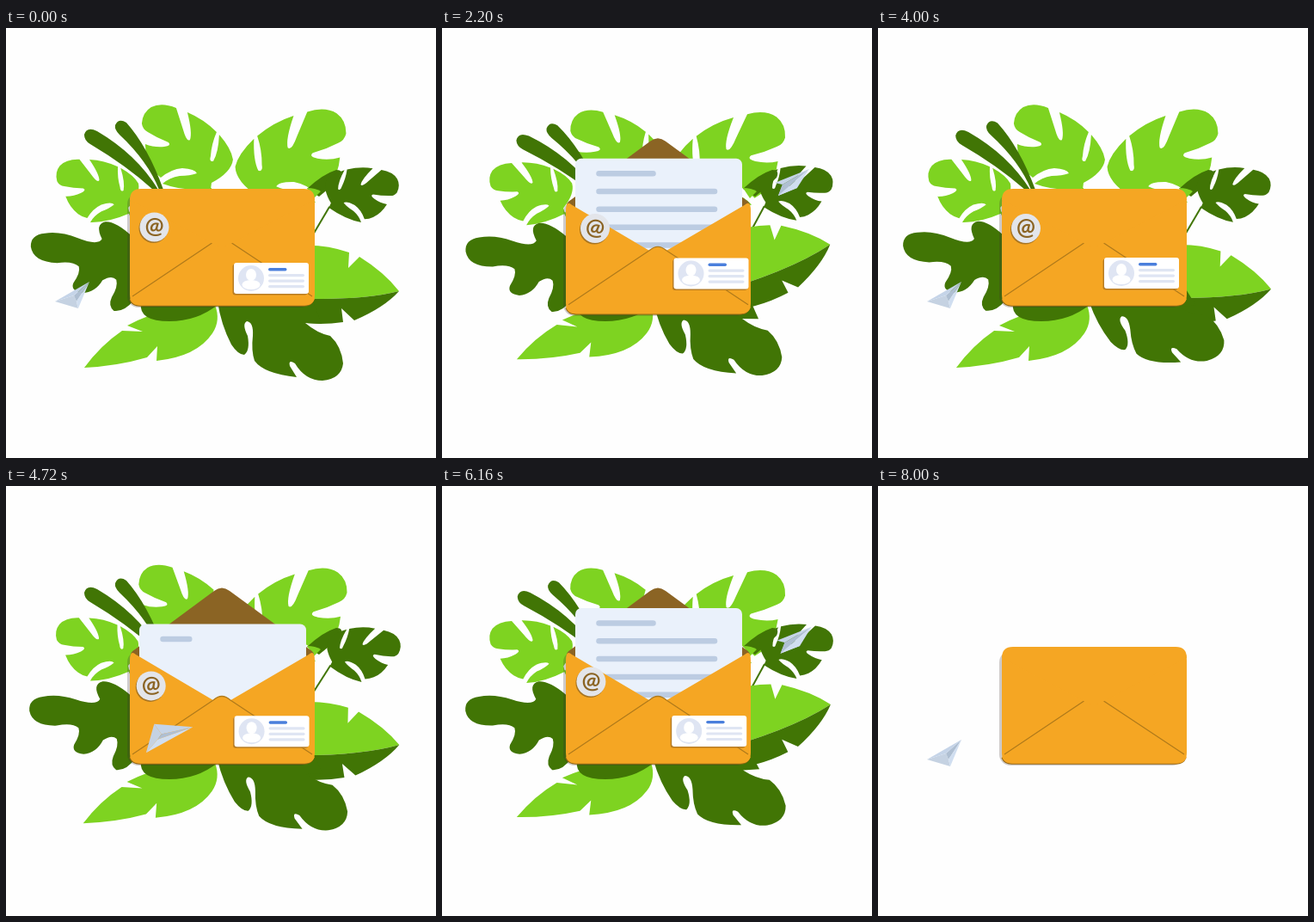
Animation, 500 px wide and 500 px high, one loop 8.04 s. Source, as an HTML page with a canvas:

```html
<!DOCTYPE html>
<html lang="en">
<head>
<meta charset="utf-8">
<title>Mail</title>
<style>
html, body { margin: 0; width: 100%; height: 100%; overflow: hidden; background: #fefefe; }
canvas { display: block; }
</style>
</head>
<body>
<canvas id="stage" width="500" height="500"></canvas>
<script>
const c = document.getElementById('stage').getContext('2d');
const LOOP = 8040, CYCLE = 4000, RAD = Math.PI / 180;
const LIGHT = '#7ed321', DARK = '#417505', ORANGE = '#f5a623', BROWN = '#8b6424', CREASE = '#b07a1a';
const path = d => new Path2D(d);
const clamp = x => Math.max(0, Math.min(1, x));
const wave = x => (1 - Math.cos(2 * Math.PI * x)) / 2;
const ramp = (t, from, to) => clamp((t - from) / (to - from));
const ease = (t, from, to) => wave(ramp(t, from, to) / 2);

function fill(shape, color) { c.fillStyle = color; c.fill(shape); }
function stroke(shape, color, width) { c.strokeStyle = color; c.lineWidth = width; c.stroke(shape); }
function box(x, y, w, h, r, color) {
  c.beginPath(); c.roundRect(x, y, w, h, r); c.fillStyle = color; c.fill();
}
function disc(x, y, rx, ry, color) {
  c.beginPath(); c.ellipse(x, y, rx, ry, 0, 0, 7); c.fillStyle = color; c.fill();
}
function group(draw) { c.save(); draw(); c.restore(); }

// Smooth cyclic interpolation; the last time closes the loop.
function spline(times, rows, t) {
  const n = rows.length, period = times[n];
  const at = k => times[(k + n) % n] + Math.floor(k / n) * period;
  let i = n - 1;
  while (times[i] > t) i--;
  const h = at(i + 1) - at(i), u = (t - at(i)) / h;
  return rows[0].map((_, j) => {
    const v = k => rows[(k + n) % n][j];
    const slope = k => (v(k + 1) - v(k - 1)) / (at(k + 1) - at(k - 1)) * h;
    const s = u * u * (3 - 2 * u);
    return v(i) + (v(i + 1) - v(i)) * s
      + slope(i) * u * (1 - u) ** 2 - slope(i + 1) * u * u * (1 - u);
  });
}

// Split leaf, placed so that its inner slit lands on (x, y).
const splitLeaf = path(`M238 188L239 180Q262 168 264 153Q262 140 248 124Q247 145 241 155
  Q236 156 238 149Q239 135 245 121Q230 106 211 98Q217 122 214 130Q210 133 206 118L198 93
  Q181 86 169 92Q159 98 158 111Q159 118 165 121Q176 128 189 133Q193 137 184 138
  Q172 139 162 135Q162 152 170 164Q174 170 180 174Q192 164 205 163Q220 164 222 169
  Q214 172 202 172Q190 174 182 181Q205 190 238 188Z`);
function split(x, y, scale, angle, flip, px, py) {
  const m = new DOMMatrix().translate(x, y).rotate(angle)
    .scale(flip * scale, scale).translate(-238, -154);
  const base = m.transformPoint({ x: 238, y: 186 });
  const p = new Path2D();
  p.addPath(splitLeaf, m);
  const stem = path(`M${base.x} ${base.y}L${px} ${py}`);
  return { p, stem };
}

function leaf(px, py, swing, period, shift, base, ...parts) {
  return { px, py, swing, period, shift, base, parts };
}
const leaves = [
  leaf(238, 200, -6.3, 4000, 130, 0, [split(238, 154, 1, 0, 1, 238, 200), LIGHT]),
  leaf(290, 205, 2.6, 4000, 0, 0, [split(297, 165, 1.18, 5, -1, 290, 210), LIGHT]),
  leaf(148, 225, -3.7, 4300, 100, 0, [split(134, 189, .83, -20, 1, 148, 225), LIGHT]),
  leaf(352, 190, 0, 4000, 0, 0,
    [path('M350 187Q368 170 384 165Q393 165 389 174Q380 183 364 196Z'), DARK],
    [path('M350 186Q360 186 366 190L358 198Z'), LIGHT]),
  leaf(356, 242, 5.6, 4050, 1185, -2.1, [split(387, 187, .73, 30, -1, 356, 242), DARK]),
  leaf(180, 190, -4.2, 4800, 150, 0,
    [path('M91 124Q94 114 106 120Q152 147 177 188L171 188Q140 160 98 135Q91 131 91 124Z'), DARK],
    [path('M127 113Q131 104 140 110Q165 138 183 188L178 188Q165 155 132 124Q126 118 127 113Z'), DARK]),
  leaf(150, 285, -7.5, 4100, 710, 0,
    [path(`M30 250Q30 236 47 235Q65 233 85 242Q108 252 113 244Q105 226 118 224Q130 224 148 242
      L148 316Q136 330 124 328Q117 322 122 312Q130 300 128 292Q123 286 112 292
      Q103 306 88 306Q74 303 78 294Q87 282 85 275Q78 268 60 270Q32 268 30 250Z`), DARK]),
  leaf(245, 325, 3.7, 4000, 0, 0,
    [path(`M91 395Q110 369 135 352L159 353L141 346Q165 333 190 328L243 322Q250 340 240 355
      Q222 382 175 387L176 370L164 383Q130 393 91 395Z`), LIGHT]),
  leaf(200, 325, 0, 4000, 0, 0, [path('M157 320Q154 341 190 341Q222 341 246 322Z'), DARK]),
  leaf(300, 295, -20, 4300, 0, 0,
    [path('M300 262Q350 244 399 261L398 279L411 266Q440 284 457 306Q400 320 300 312Z'), LIGHT],
    [path(`M457 306Q440 325 405 340L390 326L392 342Q350 348 310 335L300 312
      Q400 320 457 306Z`), DARK]),
  leaf(250, 320, -10.5, 8000 / 3, 0, 0,
    [path(`M246 318Q250 345 262 368Q270 380 277 380Q284 375 281 358Q274 344 280 341
      Q288 342 287 358Q285 375 289 387Q300 402 338 406L330 393Q328 385 336 390
      Q348 410 368 410Q390 408 392 390Q390 370 377 358Q362 355 348 343L367 344
      L357 318Z`), DARK])
];

function drawLeaf(l, t) {
  group(() => {
    c.translate(l.px, l.py);
    c.rotate((l.base + l.swing * wave((t + l.shift) / l.period)) * RAD);
    c.translate(-l.px, -l.py);
    for (const [shape, color] of l.parts) {
      if (shape.stem) stroke(shape.stem, color, 2);
      fill(shape.p || shape, color);
    }
  });
}

// Each row: nose, wing tip, inner fold, keel, other wing tip.
const planeTimes = [0, 840, 1440, 2200, 2920, 4000];
const planePoses = [
  [97, 295, 57, 318, 79, 311, 82, 318, 84, 326],
  [243, 273, 197, 268, 205, 281, 200, 287, 187, 303],
  [384, 203, 334, 223, 358, 220, 360, 226, 380, 233],
  [427, 164, 387, 180, 396, 182, 391, 195, 413, 186],
  [267, 215, 227, 238, 249, 231, 252, 238, 254, 246]
];
function drawPlane(u) {
  const q = spline(planeTimes, planePoses, u);
  const facet = (ids, color) => fill(path('M' + ids.map(i => q[2 * i] + ' ' + q[2 * i + 1]).join('L') + 'Z'), color);
  facet([1, 2, 3, 4], '#c5d2e2');
  facet([0, 2, 3], '#afbfd2');
  facet([0, 3, 4], '#d0def0');
  facet([0, 1, 2], '#c5d4e8');
}

const sides = path(`M144 203Q144 190 151 196L251 255L352 196Q359 190 359 203V310
  Q359 322.5 347 322.5H156Q144 322.5 144 310Z`);
const pocket = path(`M144 315L241 249Q251 240 261 249L359 315Q356 322.5 347 322.5H156
  Q147 322.5 144 315Z`);
const pocketEdge = path('M147 312L241 249Q251 240 261 249L356 312');
const flapFront = path(`M144 200Q144 187 157 187H346Q359 187 359 200L263 250
  Q251 259 239 250Z`);
const flapBack = path('M145 199Q144 193 150 190L242 122Q251 115 260 122L353 190Q359 193 358 199Z');

function flip(shape, k, color) {
  group(() => {
    c.translate(0, 194); c.scale(1, k); c.translate(0, -194);
    fill(shape, color);
  });
}

function drawLetter(u) {
  const up = ease(u, 300, 1020) - ease(u, 3080, 3600);
  group(() => {
    c.translate(0, 50 * (1 - up));
    box(155, 142, 194, 125, 7, '#eaf1fb');
    c.lineCap = 'round';
    for (let i = 0; i < 5; i++) {
      const start = i ? 750 + i * 100 : 550;
      const grown = ramp(u, start, start + 350);
      if (grown) stroke(path(`M182.5 ${159.5 + i * 20.8}h${(i ? 134.5 : 63) * grown}`), '#bccce2', 6.5);
    }
  });
}

function drawEnvelope(u, lift) {
  const k = Math.cos(Math.PI * (ease(u, 0, 400) - ease(u, 3520, 3920)));
  group(() => {
    c.translate(0, lift);
    box(141, 192, 214, 133, 13, 'rgba(60,50,50,.25)');
    if (k < 0) flip(flapBack, -k, BROWN);
    box(145, 196, 213, 110, 6, BROWN);
    drawLetter(u);
    group(() => { c.translate(-.5, 1.2); fill(pocket, '#9a6a14'); });
    fill(sides, ORANGE);
    fill(pocket, ORANGE);
    stroke(pocketEdge, CREASE, 1.2);
    if (k >= 0) flip(flapFront, k, ORANGE);
  });
}

const floatTimes = [0, 840, 2200, 4000, 5440, 6920, LOOP];
const badgePoses = [[172.5, 231.5], [178, 233], [178, 233], [172, 233], [167.5, 231], [179.5, 225]];
const cardPoses = [[265, 273], [264.5, 270], [269.5, 267.5], [263, 267], [268.5, 267.5], [265, 267]];

function drawBadge(t) {
  group(() => {
    const [x, y] = spline(floatTimes, badgePoses, t);
    c.translate(x, y);
    disc(-1, 1.5, 17, 17, '#a87522');
    disc(0, 0, 17, 17, '#e3e5ea');
    c.rotate((x - 172) * 1.5 * RAD);
    c.font = 'bold 26px Lato, sans-serif';
    c.textAlign = 'center';
    c.textBaseline = 'alphabetic';
    c.fillStyle = BROWN;
    c.fillText('@', 0, 7.5);
  });
}

function drawCard(t) {
  group(() => {
    c.translate(...spline(floatTimes, cardPoses, t));
    box(-1.5, 1.5, 87, 36, 3, '#b87d24');
    box(0, 0, 87, 36, 3, '#fff');
    disc(20, 18, 15, 15, '#dfe5f3');
    disc(20, 14, 6, 7, '#fff');
    disc(20, 25.5, 10.5, 5.5, '#fff');
    box(40, 6, 21.5, 3.4, 1.7, '#4a7fdc');
    for (const y of [13, 19.5, 26]) box(40, y, 42, 3.2, 1.6, '#dfe5f3');
  });
}

function draw(t) {
  const u = t % CYCLE, bare = t >= 8000;
  const lift = t < CYCLE ? 10 * wave(u / CYCLE) : 0;
  const behind = u > 2650;
  c.fillStyle = '#fefefe';
  c.fillRect(0, 0, 500, 500);
  if (!bare) leaves.forEach(l => drawLeaf(l, t));
  if (behind || bare) drawPlane(bare ? 0 : u);
  drawEnvelope(bare ? 0 : u, lift);
  if (!bare) {
    drawBadge(t);
    drawCard(t);
    if (!behind) drawPlane(u);
  }
}

const begin = performance.now();
function tick() {
  draw((performance.now() - begin) % LOOP);
  requestAnimationFrame(tick);
}
tick();
</script>
</body>
</html>
```
